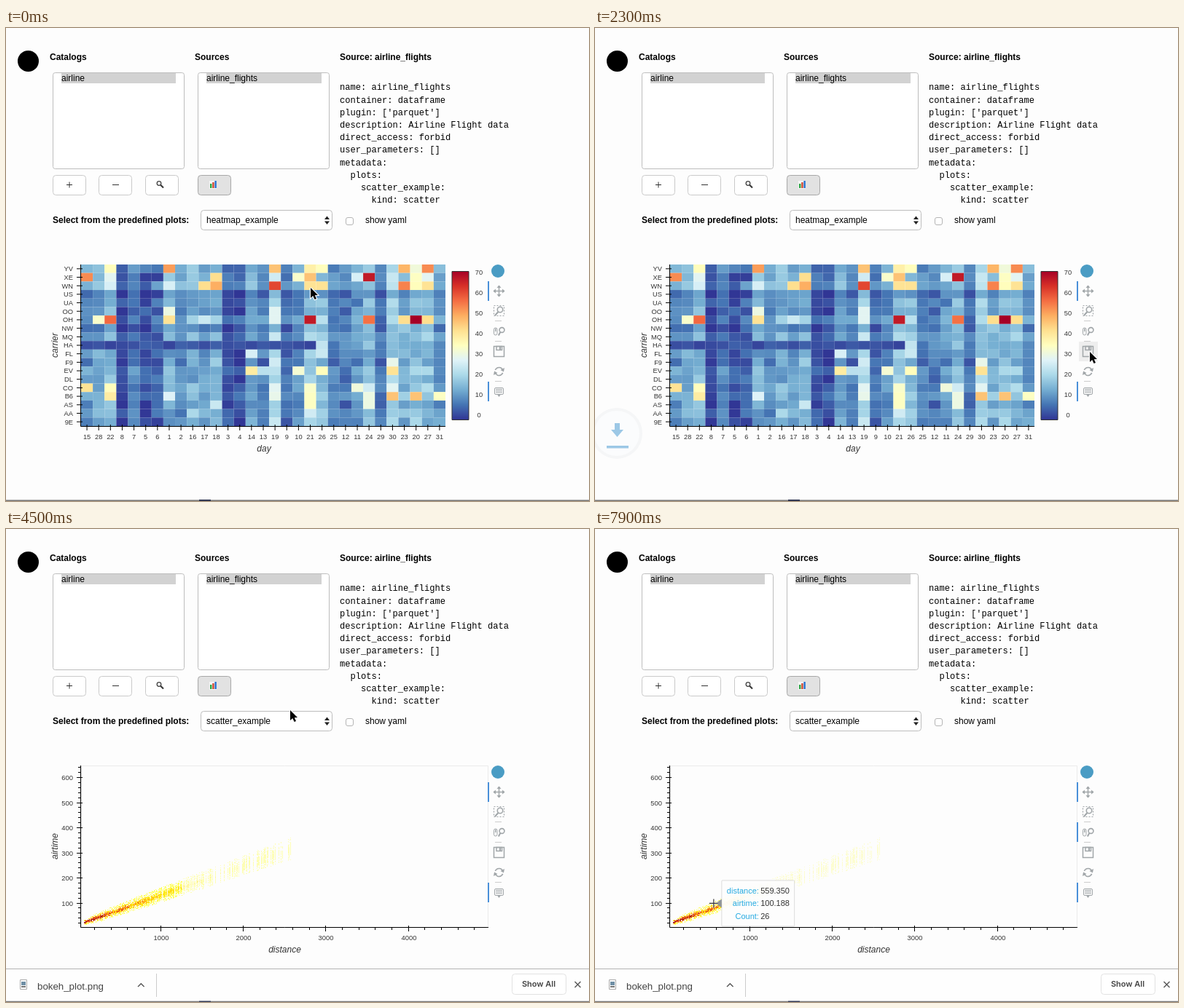
These frames come from a looping animation (800 by 650 pixels, 8000 ms). An HTML page with a canvas:

```html
<!DOCTYPE html>
<html lang="en">
<head>
<meta charset="utf-8">
<title>Airline flights</title>
<style>
html, body { margin: 0; width: 100%; height: 100%; overflow: hidden; background: #fdfdfd; }
canvas { display: block; }
</style>
</head>
<body>
<canvas id="stage" width="800" height="650"></canvas>
<script>
const c = document.getElementById('stage').getContext('2d');
const SANS = '"Liberation Sans", Arial, sans-serif';
const MONO = '"Liberation Mono", "Courier New", monospace';
const LOOP = 8000, STEP = 100;
const BLUE = '#26aae1', GREY = '#a1a6a9';

// ---------- helpers ----------
const noise = n => { const v = Math.sin(n * 12.9898) * 43758.5453; return v - Math.floor(v); };

// y is the middle of the capitals
function text(s, x, y, { size = 12, style = '', color = '#000', align = 'left', font = SANS } = {}) {
  c.font = `${style} ${size}px ${font}`;
  c.fillStyle = color;
  c.textAlign = align;
  c.fillText(s, x, y + size * 0.36);
}
function rect(x, y, w, h, color) { c.fillStyle = color; c.fillRect(x, y, w, h); }
function box(x, y, w, h, r, fill, stroke) {
  c.beginPath();
  c.roundRect(x + .5, y + .5, w, h, r);
  if (fill) { c.fillStyle = fill; c.fill(); }
  if (stroke) { c.strokeStyle = stroke; c.lineWidth = 1; c.stroke(); }
}
function line(color, width, ...paths) {
  c.strokeStyle = color;
  c.lineWidth = width;
  c.beginPath();
  for (const p of paths)
    for (let i = 0; i < p.length; i += 2) i ? c.lineTo(p[i], p[i + 1]) : c.moveTo(p[0], p[1]);
  c.stroke();
}
function poly(color, p) {
  c.fillStyle = color;
  c.beginPath();
  for (let i = 0; i < p.length; i += 2) c.lineTo(p[i], p[i + 1]);
  c.fill();
}
function ring(x, y, r, color, width, from = 0, to = 7) {
  c.strokeStyle = color;
  c.lineWidth = width;
  c.beginPath();
  c.arc(x, y, r, from, to);
  c.stroke();
}
function disc(x, y, r, color) {
  c.fillStyle = color;
  c.beginPath();
  c.arc(x, y, r, 0, 7);
  c.fill();
}
function axisTitle(s, x, y) {
  c.save();
  c.translate(x, y);
  c.rotate(-Math.PI / 2);
  text(s, 0, 0, { style: 'italic', align: 'center', color: '#333' });
  c.restore();
}

// ---------- heatmap ----------
const LEFT = 103, TOP = 325, BOTTOM = 547;
const CARRIERS = 'YV XE WN US UA OO OH NW MQ HA FL F9 EV DL CO B6 AS AA 9E'.split(' ');
const DAYS = [15, 28, 22, 8, 7, 5, 6, 1, 2, 16, 17, 18, 3, 4, 14, 13, 19, 9, 10, 21, 26, 25, 12, 11, 24, 29, 30, 23, 20, 27, 31];
const DAY_MEAN = [8, 11, 15, 1, 6, 1, 3, 12, 8, 12, 10, 12, 1, 0, 11, 6, 16, 3, 8, 16, 15, 6, 6, 9, 14, 4, 17, 13, 16, 15, 9];
const CARRIER_SHIFT = { YV: 3, XE: 3, WN: 5, US: -3, OH: 3, NW: -2, MQ: 1, F9: -1, EV: 2, CO: 2, B6: 2, AS: -1, AA: 1 };
const PEAKS = {
  YV: { 22: 35, 1: 51, 19: 46, 21: 38, 26: 35, 23: 48, 20: 31, 27: 53 },
  XE: { 15: 53, 22: 28, 5: -1, 6: -1, 18: 42, 10: 33, 21: 46, 24: 67, 11: 26, 19: 25, 20: 34, 27: 28 },
  WN: { 22: 26, 1: 26, 17: 42, 18: 49, 19: 61, 21: 41, 26: 41, 23: 54, 20: 35, 27: 41 },
  OO: { 1: 30, 19: 28 },
  OH: { 28: 33, 22: 57, 1: 41, 17: 24, 19: 28, 21: 67, 24: 56, 23: 42, 20: 71, 27: 42 },
  NW: { 23: 17.274 },
  MQ: { 19: 24 },
  HA: { 26: 23 },
  FL: { 14: 26, 26: 24 },
  F9: { 18: 18, 19: 25, 30: 29 },
  EV: { 14: 39, 13: 22, 10: 32, 26: 35, 30: 41, 19: 22 },
  CO: { 15: 41, 22: 35, 19: 28, 21: 33, 11: 31, 24: 25, 30: 28 },
  B6: { 22: 39, 1: 27, 19: 29, 21: 34, 24: 30, 30: 46, 20: 46, 31: 34 },
  AS: { 18: 24, 21: 34, 24: 30 },
  AA: { 16: 20, 21: 25 },
  '9E': { 19: 24 }
};
const COLORS = ['#313695', '#4575b4', '#74add1', '#abd9e9', '#e0f3f8', '#ffffbf', '#fee090', '#fdae61', '#f46d43', '#d73027', '#a50026'];
const CELL_W = 500 / DAYS.length, CELL_H = (BOTTOM - TOP) / CARRIERS.length;

function delay(col, row) {
  const name = CARRIERS[row], peak = PEAKS[name]?.[DAYS[col]];
  if (peak !== undefined) return peak;
  if (name === 'HA' && col < 20) return -1 + 4 * noise(col + 5);
  return Math.max(-2, DAY_MEAN[col] + (CARRIER_SHIFT[name] || 0) + 8 * (noise(col * 19 + row + 1) - .5));
}
function heatColor(v) {
  const p = Math.max(0, Math.min(9.999, (v + 2) / 7.3)), i = Math.floor(p);
  const part = (hex, k) => parseInt(hex.slice(1 + 2 * k, 3 + 2 * k), 16);
  const mix = k => Math.round(part(COLORS[i], k) + (part(COLORS[i + 1], k) - part(COLORS[i], k)) * (p - i));
  return `rgb(${mix(0)},${mix(1)},${mix(2)})`;
}
function heatmap() {
  DAYS.forEach((day, col) => {
    const x = LEFT + col * CELL_W;
    CARRIERS.forEach((_, row) => rect(x, TOP + row * CELL_H, CELL_W, CELL_H, heatColor(delay(col, row))));
    line('#000', 1, [x + CELL_W / 2, BOTTOM - 2, x + CELL_W / 2, BOTTOM + 6]);
    text(day, x + CELL_W / 2, 561.5, { size: 9.3, align: 'center', color: '#333' });
  });
  CARRIERS.forEach((name, row) => {
    const y = TOP + (row + .5) * CELL_H;
    line('#000', 1, [97, y, 105, y]);
    text(name, 92, y, { size: 9.3, align: 'right', color: '#333' });
  });
  line('#000', 1, [102.5, TOP, 102.5, BOTTOM + .5, 603, BOTTOM + .5]);
  axisTitle('carrier', 67, 436);
  text('day', 354, 578, { style: 'italic', align: 'center', color: '#333' });

  const bar = c.createLinearGradient(0, 538, 0, 334);
  COLORS.forEach((color, i) => bar.addColorStop(i / 10, color));
  rect(612, 334, 23, 204, bar);
  box(611.5, 334, 23, 204, 0, null, '#333');
  for (let v = 0; v <= 70; v += 10) text(v, 649, 532 - v * 2.81, { size: 9.3, align: 'center', color: '#333' });
}

// ---------- scatter ----------
const toX = d => 99.5 + d * .1133, toY = a => 549 - a * .345;
const toDistance = x => (x - 99.5) / .1133, toAirtime = y => (549 - y) / .345;
const typical = d => 18 + .117 * d;
const count = (d, a) => Math.round(7598.1 * Math.exp(-d / 150 - (a - typical(d)) ** 2 / 143.882));

function scatter(dimmed) {
  box(103, TOP, 558, BOTTOM - TOP, 0, null, '#ebebeb');
  for (let x = 107; x < 397; x++) {
    const far = (x - 107) / 290;
    const chance = x < 212 ? 1 : x < 242 ? .85 : x < 300 ? .55 : .4;
    if (noise(x * 3.7) > chance) continue;
    const mid = toY(typical(toDistance(x))), half = 3 + 12 * Math.sqrt(far);
    const column = (.5 + .5 * noise(x * 7.1)) * (1.45 * Math.exp(-far * 4.2) + .12);
    c.globalAlpha = (x < 242 ? .9 : .42) * (dimmed && x > 205 ? .6 : 1);
    for (let y = Math.round(mid - half); y <= mid + half; y++) {
      const off = (y - mid) / half;
      if (noise(x * 57 + y) < Math.abs(off) * .7) continue;
      const v = column * Math.exp(-3 * off * off) * (.6 + .6 * noise(x * 31 + y * 7));
      rect(x, y, 1, 1, v > .85 ? '#a01000' : v > .62 ? '#e03000' : v > .42 ? '#ff9a00' : v > .2 ? '#ffe000' : '#ffff50');
    }
  }
  c.globalAlpha = 1;

  line('#000', 1, [102.5, TOP, 102.5, BOTTOM + .5, 662, BOTTOM + .5]);
  for (let d = 200; d < 5000; d += 200) {
    const x = Math.round(toX(d)) - .5, major = d % 1000 === 0;
    line('#000', 1, [x, major ? BOTTOM - 2 : BOTTOM, x, BOTTOM + (major ? 6 : 4)]);
    if (major) text(d, x + .5, 561.5, { size: 9.4, align: 'center', color: '#333' });
  }
  for (let a = 20; a < 650; a += 20) {
    const y = Math.round(toY(a)) - .5, major = a % 100 === 0;
    line('#000', 1, [major ? 97 : 99, y, major ? 105 : 103, y]);
    if (major) text(a, 92, y, { size: 9.4, align: 'right', color: '#333' });
  }
  axisTitle('airtime', 67, 436);
  text('distance', 382.5, 578, { style: 'italic', align: 'center', color: '#333' });
}

// ---------- page ----------
const YAML = `name: airline_flights
container: dataframe
plugin: ['parquet']
description: Airline Flight data
direct_access: forbid
user_parameters: []
metadata:
  plots:
    scatter_example:
      kind: scatter`.split('\n');

function page(choice) {
  rect(0, 0, 800, 650, '#fdfdfd');
  disc(30.5, 45.5, 14.5, '#000');
  const bold = { style: 'bold' };
  text('Catalogs', 60, 39.5, bold);
  text('Sources', 259, 39.5, bold);
  text('Source: airline_flights', 458, 39.5, bold);
  YAML.forEach((s, i) => text(s, 458, 81 + i * 17.2, { size: 12.08, font: MONO }));

  [[64, 'airline', 157], [263, 'airline_flights', 158]].forEach(([x, name, w]) => {
    box(x, 61, 180, 132, 3, '#fff', '#bdbdbd');
    rect(x + 12, 62, w, 14, '#d2d2d2');
    text(name, x + 12, 68.5);
  });
  [64, 127, 191].forEach(x => box(x, 202, 45, 27, 4, '#fff', '#cacaca'));
  line('#333', 1, [83, 215.5, 91, 215.5], [87, 211.5, 87, 219.5], [146, 215.5, 155, 215.5]);
  ring(210, 213.5, 2.8, '#444', 1.3);
  line('#333', 2, [212.2, 215.7, 216, 219.5]);
  box(263, 202, 45, 27, 4, '#e2e2e2', '#a8a8a8');
  rect(279, 210, 10, 11, '#f6f6f6');
  rect(280, 214, 2.4, 6, '#28a745');
  rect(283.2, 212, 2.4, 8, '#d04a30');
  rect(286.4, 210, 2.4, 10, '#2470d0');

  text('Select from the predefined plots:', 64, 264, bold);
  box(267, 250, 180, 27, 4, '#fff', '#bdbdbd');
  text(choice, 275, 264);
  poly('#222', [437, 263, 440.5, 258.5, 444, 263]);
  poly('#222', [437, 265.5, 440.5, 270, 444, 265.5]);
  box(466, 260, 10, 10, 2.5, '#fff', '#b5b5b5');
  text('show yaml', 493, 264);
  rect(0, 648.5, 800, 1.5, '#777');
  rect(265, 648, 16, 2, '#333a55');
}

function toolbar(hoverSave, wheelOn) {
  disc(675, 334, 9, '#4a9cc4');
  rect(661, 348, 2, 27, '#4a90d9');
  rect(661, 486, 2, 27, '#4a90d9');
  if (wheelOn) rect(661, 403, 2, 27, '#4a90d9');
  if (hoverSave) rect(664, 431, 26, 27, '#eeeeee');
  [402.5, 430.5, 485.5].forEach(y => line('#ccc', 1, [671, y, 680, y]));
  // pan
  line(GREY, 1.5, [669, 361.5, 684, 361.5], [676.5, 354, 676.5, 369]);
  for (let k = 0; k < 4; k++) {
    c.save();
    c.translate(676.5, 361.5);
    c.rotate(k * Math.PI / 2);
    poly(GREY, [8, 0, 4.5, -3, 4.5, 3]);
    c.restore();
  }
  // box zoom
  c.setLineDash([2, 2]);
  c.strokeStyle = GREY; c.lineWidth = 1.2;
  c.strokeRect(669.5, 381.5, 14, 14);
  c.setLineDash([]);
  ring(678, 387, 3.7, GREY, 1.6);
  line(GREY, 2, [675.5, 390, 671, 395]);
  // wheel zoom
  box(669, 411.5, 4.5, 10, 2.5, null, GREY);
  line(GREY, 1.5, [671.8, 413, 671.8, 417]);
  ring(680.5, 415, 3.4, GREY, 1.6);
  line(GREY, 2, [678.3, 418, 675.8, 422.5]);
  // save
  c.lineWidth = 1.5; c.strokeStyle = GREY;
  c.strokeRect(669.5, 437.5, 14, 14);
  c.strokeRect(673, 437.5, 7.5, 5);
  rect(677, 438, 2, 4, GREY);
  // reset
  ring(676.5, 472, 5.5, GREY, 1.6, 3.5, 5.9);
  ring(676.5, 472, 5.5, GREY, 1.6, .35, 2.8);
  poly(GREY, [684, 467, 683, 472.5, 678.5, 470]);
  poly(GREY, [669, 477, 670, 471.5, 674.5, 474]);
  // hover
  box(670, 494, 12, 9, 1.5, null, GREY);
  poly(GREY, [674, 503.5, 679, 503.5, 676.5, 507]);
  line(GREY, 1, [672, 496.5, 681, 496.5], [672, 498.7, 681, 498.7], [672, 500.9, 681, 500.9]);
}

function downloadBadge(alpha) {
  c.save();
  c.globalAlpha = alpha;
  disc(30, 557, 35, '#f5f6f7');
  disc(30, 557, 31, '#fbfcfd');
  rect(27, 543, 7, 10, '#9cc8e6');
  poly('#9cc8e6', [22, 552, 39, 552, 30.5, 562]);
  rect(16, 574, 30, 3.5, '#9cc8e6');
  c.restore();
}

function shelf(shown) {
  c.save();
  c.beginPath();
  c.rect(0, 604, 800, 44.5);
  c.clip();
  c.translate(0, 45 * (1 - shown));
  rect(0, 604, 800, 45, '#fefefe');
  rect(0, 604, 800, 1, '#b4b4b4');
  box(19, 619, 9, 13, 0, '#fff', '#aaa');
  rect(21, 622, 6, 5, '#6f8fa5');
  rect(21, 628, 6, 2, '#777');
  text('bokeh_plot.png', 43, 628.5, { size: 13.3, color: '#444' });
  line('#555', 1.4, [181, 629, 185.3, 624.7, 189.6, 629]);
  rect(206, 611, 1, 32, '#ccc');
  box(694, 611, 74, 28, 4, '#fff', '#e2e2e2');
  text('Show All', 731, 625.5, { size: 11, style: '600', align: 'center', color: '#444', font: 'Inter, sans-serif' });
  line('#555', 1.4, [780.5, 622, 788.5, 630], [788.5, 622, 780.5, 630]);
  c.restore();
}

function menu(y) {
  c.save();
  c.shadowColor = 'rgba(0,0,0,.3)';
  c.shadowBlur = 6;
  box(258, 233, 194, 43, 5, '#f4f4f4');
  c.restore();
  ['scatter_example', 'heatmap_example'].forEach((name, i) => {
    const mid = 246 + i * 18, lit = Math.abs(y - mid) < 9;
    if (lit) rect(258, mid - 9, 195, 18, '#2f7cf6');
    text(name, 275, mid, { color: lit ? '#fff' : '#000' });
    if (i) line(lit ? '#fff' : '#000', 1.5, [263, 264, 265.5, 267, 270, 260]);
  });
}

// rows of [label, value] beside the point x, y
function tooltip(x, y, rows, onLeft) {
  c.font = `11px ${SANS}`;
  const widest = k => Math.max(...rows.map(r => c.measureText(r[k]).width));
  const labels = widest(0), w = labels + widest(1) + 16;
  const left = onLeft ? x - 10 - w : x + 11, edge = onLeft ? left + w : left;
  box(left - .5, y - 32, w, 63, 1, 'rgba(253,253,253,.95)', '#dcdcdc');
  poly('#909599', [edge, y - 6, edge, y + 6, edge + (onLeft ? 8.5 : -8.5), y]);
  rows.forEach(([label, value], i) => {
    const mid = y + (i - 1) * 17.2;
    text(label, left + 7 + labels, mid, { size: 11, align: 'right', color: BLUE });
    text(value, left + 9.3 + labels, mid, { size: 11, color: '#333' });
  });
}

// ---------- pointer ----------
const PATH = [
  [0, 418, 357], [500, 418, 357], [800, 440, 380], [1300, 557, 413], [1700, 645, 432], [2000, 679, 445],
  [2500, 679, 445], [2700, 622, 420], [3100, 388, 264], [3300, 388, 263], [3500, 390, 249], [4600, 390, 249],
  [4900, 316, 430], [5300, 114, 532], [5500, 129, 531], [5900, toX(391.553), toY(71.408)],
  [6100, 277, 465], [6400, 141, 532], [6600, 170, 515], [7000, 674, 415], [7300, 674, 415],
  [7600, 300, 480], [7800, toX(559.35), toY(100.188)], [LOOP, toX(559.35), toY(100.188)]
];
function pointer(t) {
  const i = Math.max(1, PATH.findIndex(p => p[0] >= t));
  const [t0, x0, y0] = PATH[i - 1], [t1, x1, y1] = PATH[i];
  const k = Math.min(1, Math.max(0, (t - t0) / (t1 - t0)));
  return [x0 + (x1 - x0) * k, y0 + (y1 - y0) * k];
}
function arrow(x, y) {
  const shape = [0, 0, 0, 14, 3.2, 11, 5.6, 16, 8, 15, 5.8, 10.2, 10, 10].map((v, i) => v + (i % 2 ? y : x));
  line('#fff', 2.2, [...shape, x, y]);
  poly('#000', shape);
}
function cross(x, y) {
  const arms = [[x - 6, y, x + 6, y], [x, y - 6, x, y + 6]];
  line('rgba(255,255,255,.8)', 3, ...arms);
  line('#333', 1.2, ...arms);
}

// ---------- scene ----------
function draw(t) {
  const scattered = t >= 4200;
  const [x, y] = pointer(t);
  page(t < 3600 ? 'heatmap_example' : 'scatter_example');
  scattered ? scatter(t >= 4900) : heatmap();
  toolbar(t >= 1900 && t < 2600, t >= 7200);
  if (t >= 2100 && t < 2600) downloadBadge(Math.min(1, (t - 2000) / 200, (2600 - t) / 250));
  if (t >= 2600) shelf(Math.min(1, (t - 2500) / 200));
  if (t >= 3200 && t < 3600) menu(y);

  const right = scattered ? 662 : 603;
  const inside = t > 500 && x > LEFT && x < right && y > TOP && y < BOTTOM;
  if (!inside) return arrow(x, y);
  if (scattered) {
    const d = toDistance(x), a = toAirtime(y);
    tooltip(x, y, [['distance:', d.toFixed(3)], ['airtime:', a.toFixed(3)], ['Count:', count(d, a)]], x > 382);
  } else {
    // the tip trails the pointer a little
    const [px, py] = pointer(t - 60);
    const col = Math.min(30, Math.floor((px - LEFT) / CELL_W)), row = Math.max(0, Math.floor((py - TOP) / CELL_H));
    tooltip(LEFT + (col + .5) * CELL_W, TOP + (row + .5) * CELL_H,
      [['day:', DAYS[col]], ['carrier:', CARRIERS[row]], ['depdelay:', delay(col, row).toFixed(3)]], px > 353);
  }
  cross(x, y);
}

let last = -1;
function tick() {
  const t = Math.floor(performance.now() % LOOP / STEP) * STEP;
  if (t !== last) draw(last = t);
  requestAnimationFrame(tick);
}
tick();
</script>
</body>
</html>
```
